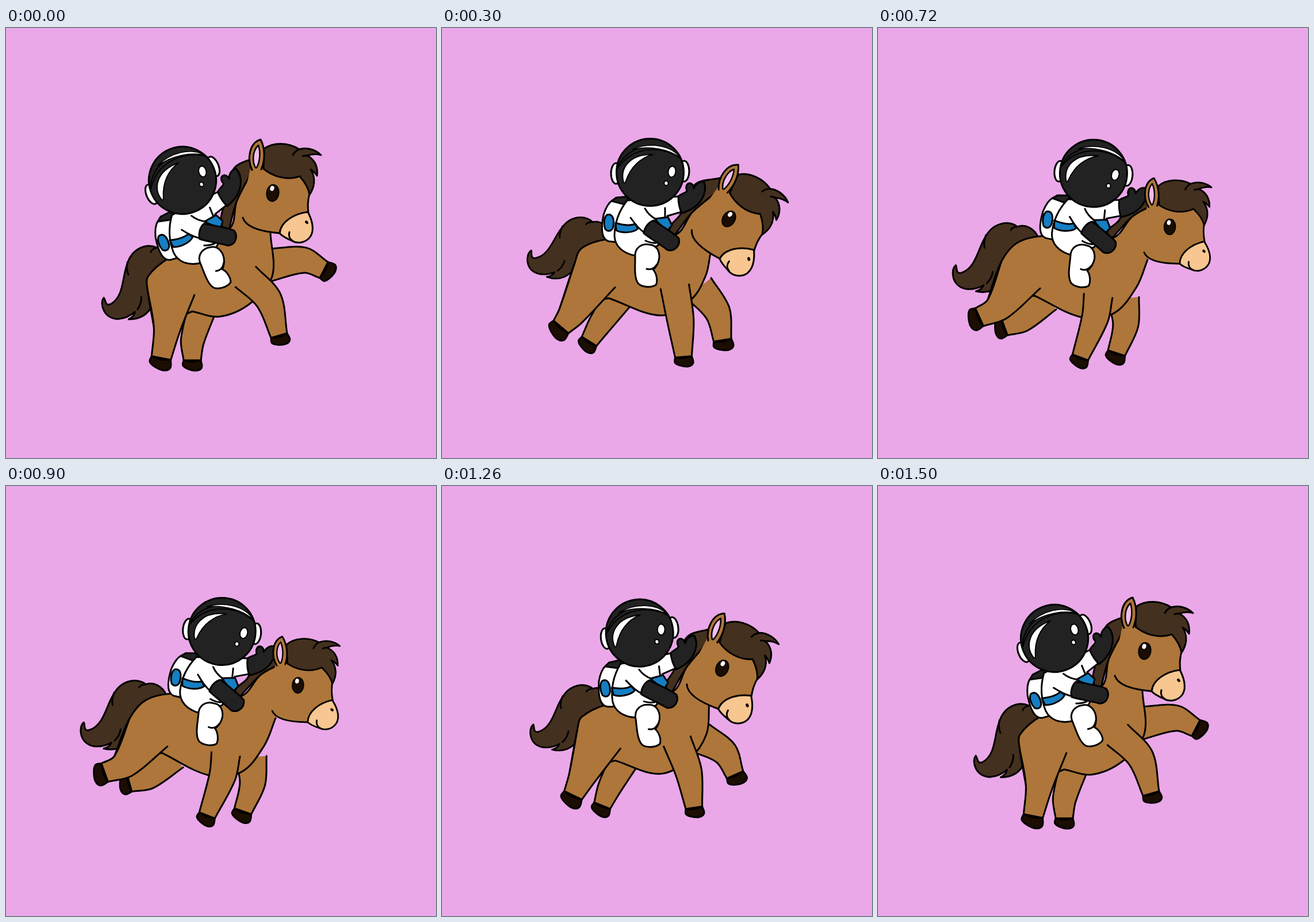
Animation of 748x748 px, one loop 1560 ms. Source, as an HTML page with a canvas:

```html
<!DOCTYPE html>
<html lang="en">
<head>
<meta charset="utf-8">
<title>Space rider</title>
<style>
html, body { margin: 0; width: 100%; height: 100%; overflow: hidden; background: #eaa8e8; }
canvas { display: block; width: 748px; height: 748px; }
</style>
</head>
<body>
<canvas id="stage" width="748" height="748"></canvas>
<script>
const ctx = document.getElementById('stage').getContext('2d');
const PINK = '#eaa8e8', COAT = '#ae763a', HAIR = '#44301e', HOOF = '#1c0d02',
  SNOUT = '#f8c690', BLUE = '#167ec2', DARK = '#222', WHITE = '#fff';
const LOOP = 1560, STEP = 60;

// head, rider, tail: pivot x, y, turn, scale
// under: groin, belly, brisket, chest, throat; legs: hip, knee, ankle
const rear = {
  head: [464, 287, 0, 1], rider: [307, 265, -22.3, 1], tail: [240, 381, -4.8, 1],
  under: [324, 493, 372, 502, 425, 479, 463, 432, 460, 357],
  hind: [287, 460, 280, 524, 270, 574], farHind: [342, 485, 324, 546, 324, 578],
  fore: [417, 433, 457, 473, 475, 535], farFore: [460, 412, 520, 404, 553, 421]
};
const land = {
  head: [499, 332, 22.7, 1], rider: [362, 251, 0, 1], tail: [243, 330, 13.8, .93],
  under: [290, 470, 382, 500, 434, 472, 459, 430, 467, 392],
  hind: [266, 430, 224, 500, 207, 520], farHind: [305, 472, 274, 516, 256, 545],
  fore: [405, 450, 415, 510, 420, 572], farFore: [446, 452, 480, 496, 488, 543]
};
const stand = {
  head: [503, 333, -9.2, .935], rider: [362, 251, 0, 1], tail: [214, 352, 0, 1],
  under: [293, 486, 366, 502, 420, 478, 457, 438, 469, 393],
  hind: [253, 447, 254, 522, 248, 569], farHind: [310, 480, 300, 532, 301, 569],
  fore: [395, 453, 393, 508, 385, 572], farFore: [439, 455, 461, 508, 459, 559]
};
const reach = {
  head: [508, 347, -5, .935], rider: [376, 253, 6, 1], tail: [222, 339, 7.2, 1],
  under: [271, 464, 352, 503, 409, 498, 449, 452, 469, 404],
  hind: [248, 428, 203, 486, 170, 497], farHind: [292, 470, 244, 508, 213, 516],
  fore: [382, 467, 376, 505, 349, 573], farFore: [425, 472, 428, 518, 411, 566]
};

const mix = (a, b, k) => Object.fromEntries(Object.keys(a).map(part =>
  [part, a[part].map((v, i) => v + (b[part][i] - v) * k)]));

// Rises to 1 over `up` ms, stays for `hold`, falls back over `down`
const swing = (t, up, hold, down) =>
  Math.max(0, Math.min(1, t / up, (up + hold + down - t) / down));

// A stretched stride on the ground, then a cut to the leap
function poseAt(t) {
  return t >= 360 && t < 1140
    ? mix(stand, reach, 1.25 * swing(t - 360, 490, 0, 230))
    : mix(land, rear, swing((t + LOOP - 1140) % LOOP, 360, 60, 300));
}

function paint(path, fill, line = 3) {
  if (fill) { ctx.fillStyle = fill; ctx.fill(path); }
  if (line) { ctx.lineWidth = line; ctx.stroke(path); }
}
const draw = (d, fill, line) => paint(new Path2D(d), fill, line);

function oval(x, y, rx, ry, fill, line, turn = 0) {
  const p = new Path2D();
  p.ellipse(x, y, rx, ry, turn, 0, Math.PI * 2);
  paint(p, fill, line);
}

const pairs = list => Array.from({ length: list.length / 2 }, (_, i) => list.slice(i * 2, i * 2 + 2));
const shift = ([x, y], dx, dy) => [x + dx, y + dy];
const between = (a, b, k) => a.map((v, i) => v + (b[i] - v) * k);

// Smooth curve through points, with sharp turns at the given indices
function curve(pts, corners = []) {
  const path = new Path2D();
  const handle = (i, from, to, sign) => {
    const len = Math.hypot(to[0] - from[0], to[1] - from[1]) / 3;
    const sharp = corners.includes(i) || !pts[i - 1] || !pts[i + 1];
    const [a, b] = sharp ? [from, to] : [pts[i - 1], pts[i + 1]];
    const dx = b[0] - a[0], dy = b[1] - a[1], d = Math.hypot(dx, dy) || 1;
    return shift(pts[i], sign * dx / d * len, sign * dy / d * len);
  };
  path.moveTo(...pts[0]);
  for (let i = 0; i < pts.length - 1; i++) {
    const p = pts[i], q = pts[i + 1];
    path.bezierCurveTo(...handle(i, p, q, 1), ...handle(i + 1, p, q, -1), ...q);
  }
  return path;
}

// Both outlines of a leg, offset from its joints by half widths
function limb(list, widths) {
  const joints = pairs(list);
  const side = sign => joints.map((p, i) => {
    const a = joints[Math.max(0, i - 1)], b = joints[Math.min(2, i + 1)];
    const dx = b[0] - a[0], dy = b[1] - a[1], k = sign * widths[i] / Math.hypot(dx, dy);
    return shift(p, -dy * k, dx * k);
  });
  return { back: side(1), front: side(-1) };
}

const hoofShape = [[0, 0], [.5, .08], [1, 0], [1.05, .42], [.75, .6], [.25, .5], [-.04, .3]];

function leg({ back, front }) {
  const [px, py] = back[2], ux = front[2][0] - px, uy = front[2][1] - py;
  const pts = hoofShape.map(([s, t]) => [px + ux * s - uy * t, py + uy * s + ux * t]);
  paint(curve([...pts, pts[0]], [2]), HOOF);
  paint(curve([...back, ...front.reverse()], [2, 3]), COAT);
}

// Runs a drawing whose own pivot is (px, py) at the given placement
function place([x, y, turn, scale], px, py, drawing) {
  ctx.save();
  ctx.translate(x, y);
  ctx.rotate(turn * Math.PI / 180);
  ctx.scale(scale, scale);
  ctx.translate(-px, -py);
  drawing();
  ctx.restore();
}

// Where a point of such a drawing ends up
function locate([x, y, turn, scale], px, py, [qx, qy]) {
  const r = turn * Math.PI / 180, c = Math.cos(r) * scale, s = Math.sin(r) * scale;
  const dx = qx - px, dy = qy - py;
  return [x + dx * c - dy * s, y + dx * s + dy * c];
}

function tail() {
  draw('M275 372C266 353 247 349 236 355C219 345 193 353 183 378C172 398 173 435 148 446C138 450 140 438 137 434C128 443 134 472 160 473C172 473 182 468 189 463C187 470 182 473 177 475C195 477 208 470 216 460L245 420Z', HAIR);
  draw('M236 355C230 356 226 359 225 362M183 376C181 384 181 392 183 398M202 438C202 447 198 454 194 459');
}

function mane(nape, neck, withers) {
  const mid = between(nape, neck, .5);
  paint(curve([shift(nape, 0, -20), shift(mid, -20, -28), shift(neck, -22, 5),
    shift(withers, -14, -6), withers, neck, nape], [4, 6]), HAIR);
}

function head() {
  draw('M425 245L450 235 520 258 529 285C524 300 525 312 526 322L490 360C460 358 422 352 412 330L415 290Z', COAT, 0);
  draw('M529 285C524 300 525 312 526 322M412 330C417 346 440 354 477 357');
  draw('M476 357C478 337 501 323 525 320C532 333 537 350 530 362C522 374 507 376 497 370C488 366 480 362 476 357Z', SNOUT);
  draw('M493 355C491 362 494 368 500 371');
  oval(523, 338, 2, 3, '#000', 1, -.7);
  oval(464, 287, 10.5, 14.5, HOOF, 2, .15);
  oval(463, 279, 3.5, 4.5, WHITE, 0, .3);
  draw('M449 210C465 198 492 199 510 211C522 207 538 211 548 221C538 218 530 220 524 222C538 229 543 243 541 257C538 252 533 248 530 246C540 262 536 278 528 290C526 276 518 266 511 258C488 266 464 258 448 245Z', HAIR);
  draw('M510 211C505 213 501 217 499 221M524 222C521 222 518 222 516 223');
}

function ear() {
  draw('M428 247C419 228 423 200 443 194C452 212 450 232 444 246', COAT);
  draw('M434 243C427 230 430 212 439 204C443 216 442 232 436 243Z', '#f0bdf0', 2.5);
}

function rider() {
  draw('M296 300L330 292 325 375 290 371C276 367 277 345 281 325C285 312 290 304 296 300Z', WHITE);
  draw('M295 301L303 295 326 293 318 307Z', DARK);
  draw('M287 325C297 322 300 333 298 345C296 354 289 355 284 350C281 342 281 330 287 325Z', BLUE);
  draw('M322 300C308 318 300 340 300 362C301 380 315 392 336 396L375 379 396 350 392 327 416 320 411 293Z', WHITE);
  draw('M411 293C418 287 425 287 426 283C423 276 426 270 431 270C435 270 438 275 438 279C442 270 450 266 456 268C462 285 452 312 417 322C412 312 411 302 411 293Z', DARK);
  draw('M302 339C315 343 328 344 336 341L341 349C332 357 312 357 303 352Z', BLUE);
  draw('M370 332L393 329 400 343 393 352C384 347 376 339 370 332Z', BLUE);
  draw('M353 314C358 323 365 329 373 333M388 313L388 328M328 330C335 340 342 349 352 356M354 370C360 373 366 374 372 374');
  draw('M336 400C334 380 350 374 362 377C376 378 382 395 375 410C372 416 370 419 367 420C373 426 376 440 372 447C362 453 346 450 341 444C334 434 336 415 336 400Z', WHITE);
  draw('M374 411C369 419 362 421 356 419');
  draw('M351 357C352 347 360 337 368 335C385 346 405 358 412 366C415 378 405 390 392 386C378 375 362 366 351 357Z', DARK);
  oval(303, 253, 9, 18, WHITE);
  oval(421, 249, 9, 18, WHITE);
  oval(362, 251, 58.5, 58.5, DARK);
  draw('M304 246C318 205 378 188 417 229C392 208 336 198 304 246Z', DARK, 2);
  draw('M331 211C362 198 398 204 414 225C395 211 362 204 331 211Z', WHITE, 1.5);
  draw('M316 269C309 245 325 219 367 220C345 226 328 242 320 266Q318 271 316 269Z', WHITE, 2);
  oval(400, 250, 6.5, 9.5, WHITE, 2, .15);
  oval(390, 270, 3.6, 4, WHITE, 2);
}

function horse(p) {
  const onRider = pt => locate(p.rider, 362, 251, pt);
  const nape = locate(p.head, 464, 287, [430, 246]);
  const [neck, withers, rump, haunch] = [[436, 320], [405, 360], [290, 367], [243, 383]].map(onRider);
  const hind = limb(p.hind, [41, 23, 17]);

  place(p.tail, 214, 352, tail);
  mane(nape, neck, withers);
  leg(limb(p.farHind, [25, 20, 15]));
  leg(limb(p.farFore, [28, 22, 15.5]));
  paint(curve([nape, neck, withers, rump, haunch, hind.back[0], hind.back[1], ...pairs(p.under)], [6, 7]), COAT);
  leg(hind);
  leg(limb(p.fore, [25, 23, 14.5]));
  place(p.head, 464, 287, head);
}

function frame() {
  const p = poseAt(Math.floor(performance.now() % LOOP / STEP) * STEP);
  ctx.fillStyle = PINK;
  ctx.fillRect(0, 0, 748, 748);
  ctx.strokeStyle = '#000';
  ctx.lineCap = ctx.lineJoin = 'round';
  horse(p);
  place(p.rider, 362, 251, rider);
  place(p.head, 464, 287, ear);
  requestAnimationFrame(frame);
}
requestAnimationFrame(frame);
</script>
</body>
</html>
```
